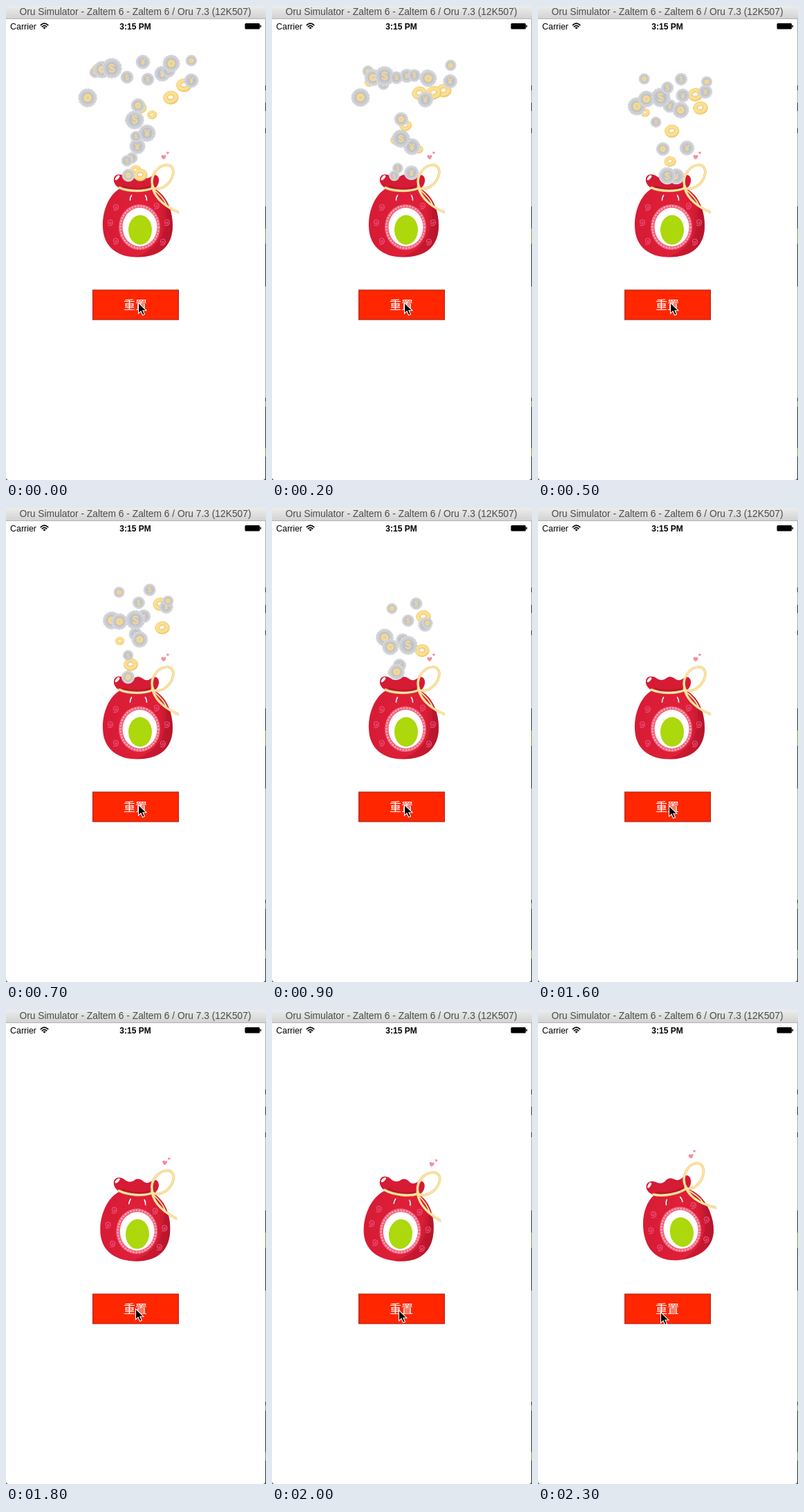
Write an HTML page that moves like this. It is 376 px wide and 686 px high and loops after 2.4 s.

```html
<!DOCTYPE html>
<html lang="zh">
<head>
<meta charset="utf-8">
<title>Coin bag</title>
<style>
  html, body { margin: 0; width: 100%; height: 100%; overflow: hidden; background: #fff; }
  svg { display: block; width: 376px; height: 686px; }
  text { font-family: "Liberation Sans", Arial, sans-serif; text-anchor: middle; }
  .label { font-family: "Noto Sans CJK SC", "Noto Sans CJK", sans-serif; font-weight: 300; }
  .sign { font-weight: bold; fill: #f6d98f; }
  .line { fill: none; stroke-linecap: round; }
</style>
</head>
<body>
<svg viewBox="0 0 376 686">
  <defs>
    <linearGradient id="bar" x2="0" y2="1">
      <stop stop-color="#ececec"/><stop offset="1" stop-color="#d2d2d2"/>
    </linearGradient>
    <linearGradient id="red">
      <stop stop-color="#d71b35"/><stop offset=".6" stop-color="#e02038"/>
      <stop offset=".82" stop-color="#d91d35"/><stop offset="1" stop-color="#b5162b"/>
    </linearGradient>
    <clipPath id="frame"><rect x="125" y="200" width="125" height="170"/></clipPath>
    <g id="silver">
      <circle r="9.6" fill="#c9cbd1" stroke="#dfe0e4" stroke-width="1.4"/>
      <circle r="9.9" fill="none" stroke="#bcbec5" stroke-width=".7" stroke-dasharray="2 1.6"/>
      <circle r="7.2" fill="#bfc2ca" stroke="#d7d9de" stroke-width=".7"/>
    </g>
    <g id="hole">
      <use href="#silver"/>
      <circle r="4.6" fill="#f7da8c" stroke="#eecb74" stroke-width=".6"/>
      <rect x="-1.6" y="-1.6" width="3.2" height="3.2" fill="#cfd0d3"/>
    </g>
    <g id="dollar"><use href="#silver"/><text class="sign" y="4.2" font-size="12">$</text></g>
    <g id="yen"><use href="#silver"/><text class="sign" y="4.2" font-size="12">¥</text></g>
    <g id="gold" transform="rotate(-12)">
      <ellipse cx=".5" cy="1" rx="10" ry="8.6" fill="#eec768"/>
      <ellipse rx="9.6" ry="8" fill="#fbdf92" stroke="#f3cf78" stroke-width=".8"/>
      <ellipse rx="4" ry="3" fill="#fffaf0" stroke="#e9bf5e" stroke-width="1"/>
    </g>
    <path id="curl" class="line" stroke="#ef5480" stroke-width="1.1"
      d="M0 0C1.6-1.6 3 1 1 2C-2 3.2-3.4-.4-2-2.4C0-5 4.6-3.6 4.4.6C4.2 4 .5 5.6-2.4 4.2"/>
    <path id="heart" fill="#f68c9c" d="M0 3.6C-5 .6-3.6-3.4-1.4-3C-.4-2.8 0-2 0-1.4C.6-3 3.6-3.4 3.4-.8C3.2 1 1.4 2.6 0 3.6Z"/>
  </defs>

  <rect width="376" height="686" fill="#fff"/>
  <rect width="376" height="18.5" fill="url(#bar)"/>
  <rect y="18" width="376" height="1" fill="#b4b4b4"/>
  <text x="187" y="13" font-size="13.8" fill="#4b4b4b">Oru Simulator - Zaltem 6 - Zaltem 6 / Oru 7.3 (12K507)</text>

  <text x="25" y="34" font-size="12.4">Carrier</text>
  <g class="line" stroke="#000" stroke-width="1.7" stroke-linecap="butt">
    <path d="M50.3 27.6Q55.5 22.8 60.7 27.6M52.3 29.9Q55.5 27 58.7 29.9"/>
  </g>
  <path d="M53.4 31.4Q55.5 29.8 57.6 31.4L55.5 33.6Z"/>
  <text x="187" y="34" font-size="12" font-weight="bold">3:15 PM</text>
  <rect x="345.5" y="25" width="21.5" height="8.5" rx="1.5"/>
  <rect x="367.5" y="27.5" width="1.5" height="3.5" rx=".7"/>

  <rect x="375" y="19" width="1" height="667" fill="#a9abad"/>
  <path stroke="#2f3430" d="M375.5 115V122M375.5 140V152M375.5 177V184M375.5 290V322M375.5 344V406M375.5 567V686"/>
  <path stroke="#7f9a4c" d="M375.5 322V344M375.5 572V580M375.5 640V652"/>
  <path fill="#555" d="M0 682Q0 686 4 686H0ZM375 682Q375 686 371 686H376Z"/>

  <rect x="125.5" y="411" width="124" height="43" fill="#ff2600" stroke="#a32415"/>
  <text class="label" x="187" y="438.5" font-size="17" fill="#fff">重置</text>

  <g id="bag"><g clip-path="url(#frame)">
    <path fill="url(#red)" d="M165 264C150 272 139 295 140 320C141 348 160 363.5 190 363.5C222 363.5 241 348 241 318C241 292 230 272 214 264Z"/>
    <path fill="#b5152b" opacity=".55" d="M230 284C236 318 226 350 188 363C222 364 241 348 241 318C241 303 237 292 230 284Z"/>
    <path fill="#d61b34" d="M166 265C159 261 155 256 156 250C157 243 165 242 171 246C176 250 181 250 186 246C190 243 194 244 198 247C203 251 207 249 211 246C217 242 222 247 221 254C220 260 217 262 214 266C198 270 180 270 166 265Z"/>
    <path fill="#ab1229" opacity=".6" d="M170 260C184 265 202 265 215 256L214 265C198 269 180 269 166 264Z"/>
    <ellipse cx="161" cy="248.5" rx="4.4" ry="2" fill="#fff" transform="rotate(-48 161 248.5)"/>
    <path class="line" stroke="#fff" stroke-width="1.6" d="M181.500 274Q179.500 277 179.500 281M201.500 274Q203.500 277 203.500 281"/>
    <use href="#curl" x="158" y="291"/><use href="#curl" x="150" y="313"/>
    <use href="#curl" x="158" y="340"/><use href="#curl" x="217" y="289"/>
    <use href="#curl" x="232" y="313"/><use href="#curl" x="226" y="341"/>
    <ellipse cx="193" cy="320" rx="30" ry="33" fill="#f0607c"/>
    <ellipse cx="193" cy="320" rx="27.500" ry="30.500" fill="none" stroke="#f9a5b3" stroke-width="2.600" stroke-dasharray="2.500 1.800"/>
    <ellipse cx="193.500" cy="320" rx="25" ry="28" fill="#fff"/>
    <ellipse cx="194" cy="324" rx="17" ry="21.500" fill="#acd80c"/>
    <g class="line" stroke="#e8c676" stroke-width="3.600">
      <path id="cord" d="M164 263C178 269 201 269 213 263C206 246 221 229 234 230C247 232 243 253 228 262C222 265 216 265 212 263C216 279 232 292 253 300"/>
    </g>
    <use href="#cord" class="line" stroke="#fce5a4" stroke-width="2.400"/>
    <path class="line" stroke="#fce5a4" stroke-width="1.800" d="M213 265C222 272 229 280 233 289"/>
    <use href="#heart" x="228" y="218.500"/>
    <use href="#heart" transform="translate(234 212.500) scale(.55)"/>
  </g></g>

  <g id="coins"></g>

  <path id="cursor" stroke="#fff" stroke-width="1.100" d="M0 0V15.500L3.600 12.200L6.200 18L9 16.800L6.400 11.200H11.400Z"/>
</svg>

<script>
const LOOP = 2400, STEP = 100, MOUTH = 250, FALL = 0.00009;

// Each coin: radius, x, y, landing x, landing time in ms
const groups = {
  gold: [
    [11, 226, 98, 174, 794], [11, 257, 114, 207, 1118], [11, 238, 132, 206, 1480],
    [9, 194, 147, 190, 621], [7, 211, 157, 212, 352], [8, 180, 165, 177, 500],
    [8, 187, 237, 187, 90], [10, 194, 244, 195, 70], [7, 131, 90, 176, 950]
  ],
  yen: [
    [11, 226, 98, 212, 662], [10, 198, 81, 183, 988], [10, 235, 93, 175, 1174],
    [10, 268, 108, 199, 1330], [12, 204, 184, 200, 520], [11, 190, 203, 204, 240]
  ],
  hole: [
    [13, 118, 133, 181, 1260], [8, 129, 96, 201, 1460], [12, 139, 92, 179, 1120],
    [12, 239, 83, 177, 950], [8, 268, 79, 206, 1290], [10, 191, 144, 176, 725],
    [9, 177, 245, 177, 60]
  ],
  dollar: [
    [8, 155, 86, 181, 842], [14, 153, 90, 208, 1130], [9, 175, 103, 208, 1360],
    [9, 205, 106, 211, 1540], [13, 186, 165, 187, 520], [8, 188, 189, 180, 260],
    [8, 182, 220, 176, 230], [8, 175, 224, 175, 130]
  ]
};

const el = id => document.getElementById(id);
const clamp = v => Math.min(1, Math.max(0, v));
const mix = (a, b, k) => a + (b - a) * k;

const coins = Object.entries(groups).flatMap(([kind, rows]) =>
  rows.map(([r, x, y, endX, end]) => {
    const node = document.createElementNS("http://www.w3.org/2000/svg", "use");
    node.setAttribute("href", "#" + kind);
    el("coins").append(node);
    return { node, r, x, y, endX, end, speed: (MOUTH - y) / end - FALL * end };
  }));

function moveCoin(c, t) {
  const flying = t < c.end;
  c.node.setAttribute("visibility", flying ? "visible" : "hidden");
  if (!flying) return;
  const x = mix(c.x, c.endX, t / c.end);
  const y = c.y + c.speed * t + FALL * t * t;
  const size = c.r / 10 * (1 - 0.08 * t / c.end);
  c.node.setAttribute("transform", `translate(${x} ${y}) scale(${size})`);
  c.node.setAttribute("opacity", mix(1, 0.7, clamp((t - 900) / 400)));
}

function draw(t) {
  coins.forEach(c => moveCoin(c, t));

  const swing = Math.max(0, (t - 1600) / 100);
  const angle = 1.55 * swing * Math.cos(Math.PI * swing);
  el("bag").setAttribute("transform", `rotate(${angle} 187 250)`);

  const a = clamp((t - 1400) / 400), b = clamp((t - 1800) / 500);
  el("cursor").setAttribute("transform", `translate(${191.5 - 4 * a - 10 * b} ${429.5 + 3 * a + 5 * b})`);
}

const start = performance.now();
function tick() {
  const t = (performance.now() - start) % LOOP;
  draw(Math.floor(t / STEP) * STEP);
  requestAnimationFrame(tick);
}
tick();
</script>
</body>
</html>
```
